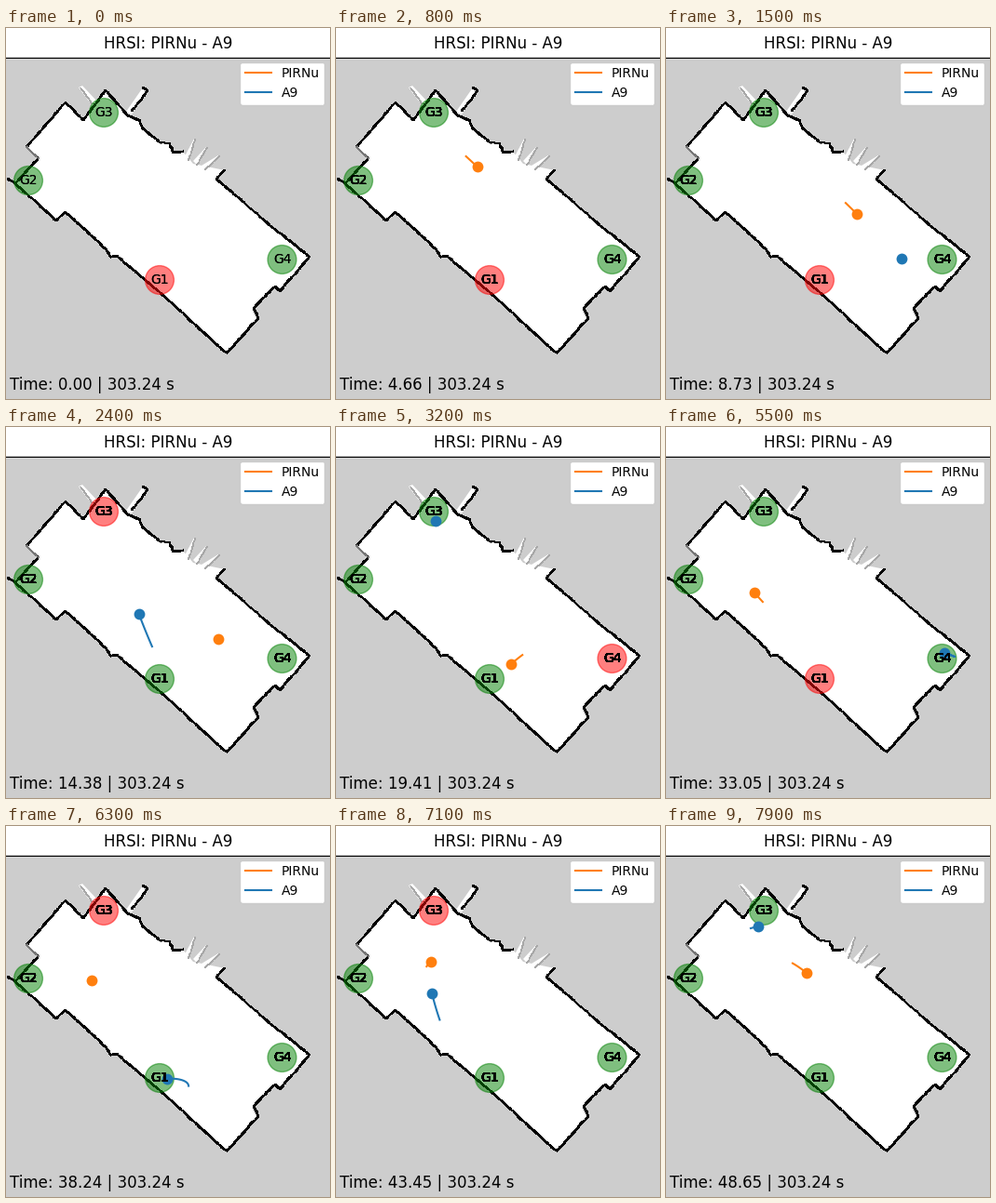
Animation, 348 px wide and 399 px high, one loop 8000 ms. Source, as a matplotlib script:

```python
import numpy as np
import matplotlib.pyplot as plt
from matplotlib.animation import FuncAnimation
from matplotlib.collections import LineCollection
from matplotlib.lines import Line2D
from matplotlib.patches import Circle, Polygon

W, H, TOP, DPI = 348, 399, 31, 100
FRAMES, STEP = 80, 100
ORANGE, BLUE = "tab:orange", "tab:blue"
TRAIL = 1.65      # trail length in frames
COPIES = 30       # goal labels are overprinted and grow heavier

plt.rcParams["font.family"] = "DejaVu Sans"
rng = np.random.default_rng(9)

fig = plt.figure(figsize=(W / DPI, H / DPI), dpi=DPI, facecolor="white")
ax = fig.add_axes([0, 0, 1, (H - TOP) / H], facecolor="#cdcdcd")
ax.set(xlim=(0, W), ylim=(H, TOP), xticks=[], yticks=[])
ax.spines[:].set_visible(False)
ax.set_title("HRSI: PIRNu - A9", fontsize=12, pad=6.7)
ax.axhline(TOP + 0.5, color="black", lw=0.72, zorder=1)


# --- floor map ---
def floor(*pts):
    ax.add_patch(Polygon(pts, fc="white", ec="none", zorder=0.5))


def wall(*pts, color="black", lw=1.1):
    """Stroke a polyline with the ragged, pixelated look of a scanned wall."""
    pts = np.array(pts, float)
    dist = np.r_[0, np.cumsum(np.hypot(*np.diff(pts, axis=0).T))]
    s = np.union1d(dist, np.arange(0, dist[-1], 3))
    p = np.c_[np.interp(s, dist, pts[:, 0]), np.interp(s, dist, pts[:, 1])]
    p += rng.normal(0, 0.25, p.shape)
    widths = lw * rng.uniform(0.6, 1.4, len(p) - 1)
    ax.add_collection(LineCollection(np.stack([p[:-1], p[1:]], 1), colors=color,
                                     linewidths=widths, antialiaseds=False, zorder=1))


west = [(10, 167), (54, 207), (64, 198), (108, 238), (112, 246), (120, 246), (165, 284)]
east = [(237, 350), (271, 312), (266, 301), (289, 278), (294, 283), (326, 246),
        (281, 210), (226, 162), (235, 153)]
north = [(190, 133), (180, 134), (175, 124), (165, 123), (147, 108), (143, 99),
         (131, 94), (107, 67), (83, 99), (64, 80), (22, 128)]
floor(*west, *east, (201, 146), *north, (35, 140))
wall((2, 162), *west, *east)
wall(*north)
wall((35, 140), (11, 166))
wall(north[-1], (35, 140), color="#777777", lw=0.6)

# open door, and rays where the scan leaked outside
floor((129, 90), (147, 64), (152, 68), (135, 93))
wall((146, 64), (152, 67), (149, 72), (135, 89), lw=0.9)
floor((78, 64), (82, 62), (98, 79), (93, 84))
wall((80, 64), (92, 81), color="#a8a8a8", lw=0.6)
for k in range(3):
    bx, by, tx, ty = 195 + 9 * k, 138 + 5 * k, 202 + 13 * k, 119 + 9 * k
    floor((bx - 3, by), (tx, ty), (tx + 1.5, ty + 1), (bx + 1, by + 4))
    wall((bx + 1, by + 4), (tx + 1, ty + 1), color="#a8a8a8", lw=0.5)

# --- goals ---
GOALS = {"G1": (165, 271), "G2": (24, 164), "G3": (105, 91), "G4": (296.5, 249)}
ACTIVE = [(0, "G1"), (20, "G3"), (29, "G2"), (31, "G4"),
          (54, "G1"), (63, "G3"), (75, None)]

discs, labels = {}, []
for name, (gx, gy) in GOALS.items():
    discs[name] = ax.add_patch(Circle((gx, gy), 15.4, color="green", alpha=0.5, lw=1, zorder=2))
    labels.append([ax.text(gx, gy, name, fontsize=10, ha="center", va="center", zorder=4)
                   for _ in range(COPIES)])


# --- moving agents ---
class Agent:
    """Follows a cubic path through poses (frame, x, y, vx, vy)."""

    def __init__(self, color, *poses):
        self.poses = np.array(poses, float)
        self.t = self.poses[:, 0]
        self.line, = ax.plot([], [], color=color, lw=1.5, zorder=3)
        self.dot, = ax.plot([], [], "o", color=color, ms=8.5, mew=0, zorder=3.1)

    def at(self, t):
        i = np.clip(np.searchsorted(self.t, t, "right") - 1, 0, len(self.t) - 2)
        a, b = self.poses[i], self.poses[i + 1]
        span = (b[:, 0] - a[:, 0])[:, None]
        u = (t[:, None] - a[:, :1]) / span
        ease = u * u * (3 - 2 * u)
        return (a[:, 1:3] * (1 - ease) + b[:, 1:3] * ease
                + span * u * (1 - u) * (a[:, 3:] * (1 - u) - b[:, 3:] * u)).T

    def update(self, n):
        shown = n >= self.t[0]
        self.line.set_visible(shown)
        self.dot.set_visible(shown)
        if shown:
            x, y = self.at(np.linspace(max(n - TRAIL, self.t[0]), n, 25))
            self.line.set_data(x, y)
            self.dot.set_data(x[-1:], y[-1:])


robot = Agent(ORANGE, (1, 112, 112, 3, 3), (15, 205, 200, 7, 7), (32, 188, 255, -8, 7),
              (45, 154, 234, -5, -4), (55, 95, 178, -5, -6), (58, 92, 166, 0, 0),
              (63, 92, 166, 0, 0), (79, 151, 158, 10, 8))
person = Agent(BLUE, (15, 253, 248, 0, 0), (20, 173, 266, -5, -5), (30, 107, 101, 0, 0),
               (32, 107, 101, 0, 0), (45, 140, 177, 16, 4), (54, 310, 247, 6, 2),
               (55, 299, 243, -10, -2), (61.4, 196, 279, -2, -12), (63, 173, 272, -14, 2),
               (77.3, 91, 110, 0, 0), (79, 99, 108, 5, -1))

# --- clock and legend ---
CLOCK_T = (0, 15, 32, 45, 55, 63, 79)
CLOCK_S = (0, 8.73, 19.41, 27.23, 33.05, 38.24, 48.65)
clock = ax.text(4.5, 388.5, "", fontsize=12, zorder=4)

ax.legend([Line2D([], [], color=c, lw=1.5) for c in (ORANGE, BLUE)], ["PIRNu", "A9"],
          loc="upper right", fontsize=10, borderaxespad=0.4, framealpha=1).set_zorder(5)


def draw(n):
    goal = [name for start, name in ACTIVE if start <= n][-1]
    for name, disc in discs.items():
        disc.set_color("red" if name == goal else "green")
    for stack in labels:
        for k, label in enumerate(stack):
            label.set_visible(k <= n + 1)
    robot.update(n)
    person.update(n)
    clock.set_text(f"Time: {np.interp(n, CLOCK_T, CLOCK_S):.2f} | 303.24 s")
    return []


anim = FuncAnimation(fig, draw, frames=FRAMES, interval=STEP, repeat=True, repeat_delay=0)
plt.show()
```
